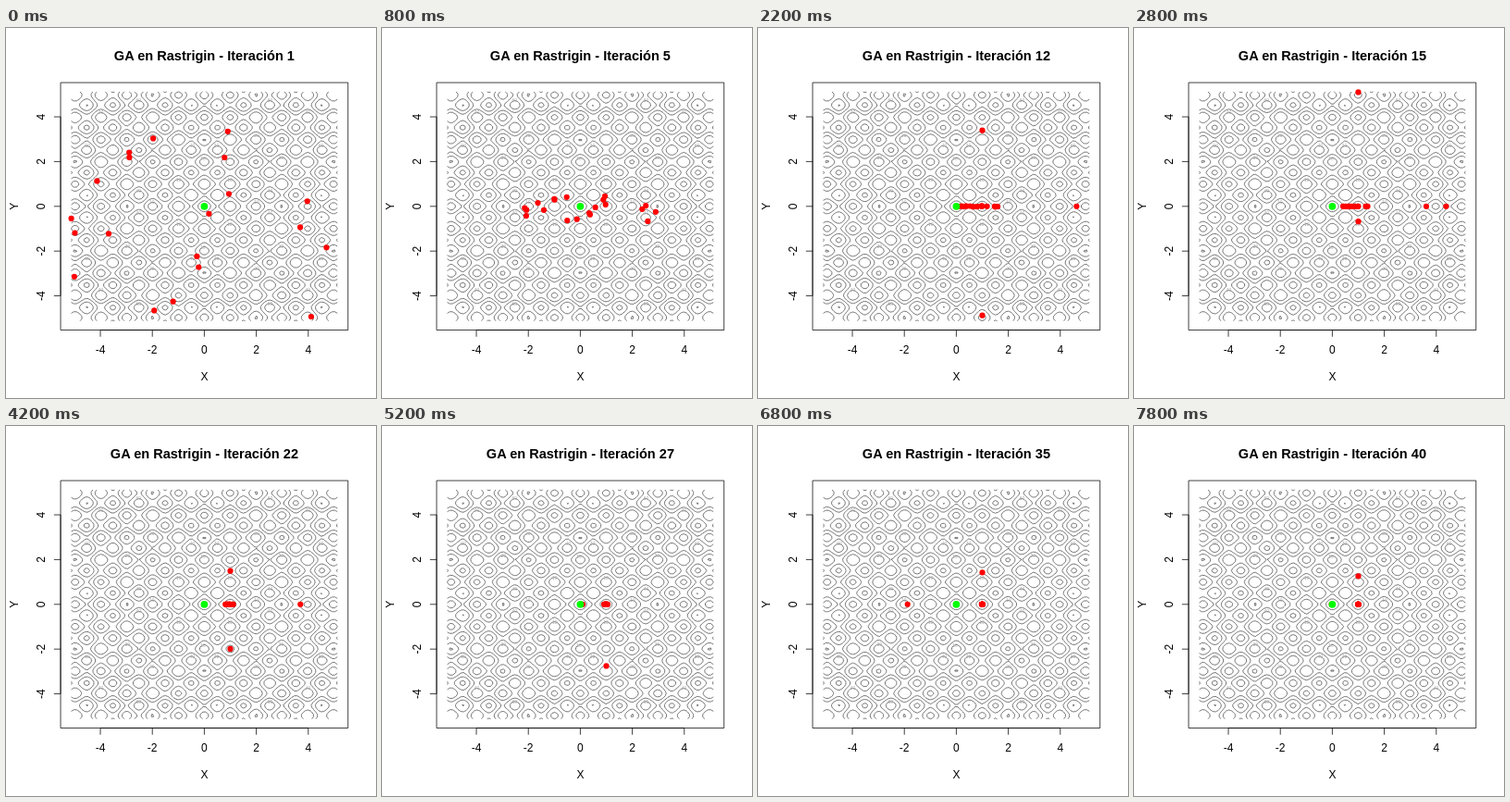
Write an HTML page that moves like this. It is 400 px wide and 400 px high and loops after 8000 ms.

```html
<!DOCTYPE html>
<html lang="es">
<head>
<meta charset="utf-8">
<title>GA en Rastrigin</title>
<style>
html, body { margin: 0; width: 100%; height: 100%; overflow: hidden; background: #fff; }
svg { display: block; width: 100%; height: 100%; }
text { font: 12px "Liberation Sans", Arial, sans-serif; text-anchor: middle; }
#title { font-size: 14.55px; font-weight: bold; }
#labels text { font-size: 5px; fill: #aaa; }
.line { fill: none; stroke: #000; stroke-width: .75; }
#contours { stroke: #444; }
</style>
</head>
<body>
<svg viewBox="0 0 400 400">
  <path id="contours" class="line"/>
  <g id="labels"></g>
  <path id="axes" class="line"/>
  <g id="ticks"></g>
  <text id="title" x="214.4" y="35"></text>
  <text x="214.4" y="381">X</text>
  <text transform="translate(13 192.8) rotate(-90)">Y</text>
  <g id="dots" fill="red"></g>
  <circle cx="214.4" cy="192.8" r="3.9" fill="lime"/>
</svg>
<script>
const $ = id => document.getElementById(id);
const add = (parent, tag, attrs, text = '') => {
  const el = document.createElementNS('http://www.w3.org/2000/svg', tag);
  for (const k in attrs) el.setAttribute(k, attrs[k]);
  el.textContent = text;
  parent.append(el);
  return el;
};
const px = x => 214.4 + 28.096 * x;
const py = y => 192.8 - 24.19 * y;
const rastrigin = (x, y) =>
  20 + x * x + y * y - 10 * (Math.cos(2 * Math.PI * x) + Math.cos(2 * Math.PI * y));

// Frame, with each axis line drawn over it from the first tick to the last
let axes = 'M59.04 59.04H369.76V326.56H59.04Z';
for (let v = -4; v <= 4; v += 2) {
  axes += `M${px(v)} 326.56v7.2M59.04 ${py(v)}h-7.2`;
  add($('ticks'), 'text', { x: px(v), y: 352 }, v);
  add($('ticks'), 'text', { transform: `translate(42 ${py(v)}) rotate(-90)` }, v);
}
$('axes').setAttribute('d', axes);
add($('ticks'), 'path', {
  class: 'line', d: `M${px(-4)} 326.56H${px(4)}M59.04 ${py(-4)}V${py(4)}`
});

// Contours: each grid cell is cut into four triangles around its centre
const N = 100, LIMIT = 5.12;
const coord = i => -LIMIT + 2 * LIMIT * i / (N - 1);
const corner = (i, j) => ({
  id: j * N + i, x: px(coord(i)), y: py(coord(j)), z: rastrigin(coord(i), coord(j))
});
const triangles = [];
for (let j = 0; j < N - 1; j++) for (let i = 0; i < N - 1; i++) {
  const c = [corner(i, j), corner(i + 1, j), corner(i + 1, j + 1), corner(i, j + 1)];
  const mean = k => c.reduce((s, p) => s + p[k], 0) / 4;
  const mid = { id: N * N + j * N + i, x: mean('x'), y: mean('y'), z: mean('z') };
  c.forEach((p, k) => triangles.push([p, c[(k + 1) % 4], mid]));
}

function traceLevel(level) {
  const nodes = new Map();
  const crossing = (a, b) => {
    if (a.id > b.id) [a, b] = [b, a];
    const key = a.id * 2 * N * N + b.id;
    if (!nodes.has(key)) {
      const t = (level - a.z) / (b.z - a.z);
      nodes.set(key, { x: a.x + t * (b.x - a.x), y: a.y + t * (b.y - a.y), next: [] });
    }
    return nodes.get(key);
  };
  for (const t of triangles) {
    const ends = [];
    t.forEach((a, k) => {
      const b = t[(k + 1) % 3];
      if (a.z > level !== b.z > level) ends.push(crossing(a, b));
    });
    if (ends.length) {
      ends[0].next.push(ends[1]);
      ends[1].next.push(ends[0]);
    }
  }
  const lines = [], all = [...nodes.values()];
  const walk = start => {
    const line = [];
    for (let p = start; p; p = p.next.find(q => !q.seen)) {
      p.seen = true;
      line.push(p);
    }
    if (line.length > 2 && start.next.includes(line.at(-1))) line.push(start);
    lines.push(line);
  };
  all.forEach(p => { if (!p.seen && p.next.length === 1) walk(p); });
  all.forEach(p => { if (!p.seen) walk(p); });
  return lines;
}

// Faint label on top of each medium-sized closed ring
function labelRing(line, level) {
  if (line[0] !== line.at(-1)) return;
  const length = line.slice(1).reduce((s, p, i) => s + Math.hypot(p.x - line[i].x, p.y - line[i].y), 0);
  if (length < 28 || length > 36) return;
  const top = line.reduce((a, b) => b.y < a.y ? b : a);
  add($('labels'), 'text', { x: top.x, y: top.y + 2 }, level);
}

let contours = '';
for (let level = 10; level <= 80; level += 10) {
  for (const line of traceLevel(level)) {
    contours += 'M' + line.map(p => p.x.toFixed(2) + ' ' + p.y.toFixed(2)).join('L');
    labelRing(line, level);
  }
}
$('contours').setAttribute('d', contours);

// Population: random start, drawn to the local minimum at (1, 0), with a few mutants
const SIZE = 20, STEPS = 40, STEP_MS = 200, BEST_X = 1;
let seed = 11;
const random = () => (seed = seed * 16807 % 2147483647) / 2147483647;
const anywhere = () => LIMIT * (2 * random() - 1);
const start = Array.from({ length: SIZE }, () => [anywhere(), anywhere()]);

function population(step) {
  const mutants = step < 8 ? 0 : step < 25 ? 4 : 2;
  const pullX = Math.exp(-step / 6), pullY = Math.exp(-step / 2);
  return start.map(([x, y], i) => {
    if (i < mutants) return i % 2 ? [BEST_X, anywhere()] : [anywhere(), 0];
    return [BEST_X + (x - BEST_X) * pullX, y * pullY];
  });
}

const steps = Array.from({ length: STEPS }, (_, i) => population(i));
const dots = start.map(() => add($('dots'), 'circle', { r: 3.1 }));
let shown = -1;
function render() {
  const step = Math.floor(performance.now() / STEP_MS) % STEPS;
  if (step !== shown) {
    shown = step;
    $('title').textContent = `GA en Rastrigin - Iteración ${step + 1}`;
    dots.forEach((dot, i) => {
      const [x, y] = steps[step][i];
      dot.setAttribute('cx', px(x));
      dot.setAttribute('cy', py(y));
    });
  }
  requestAnimationFrame(render);
}
render();
</script>
</body>
</html>
```
